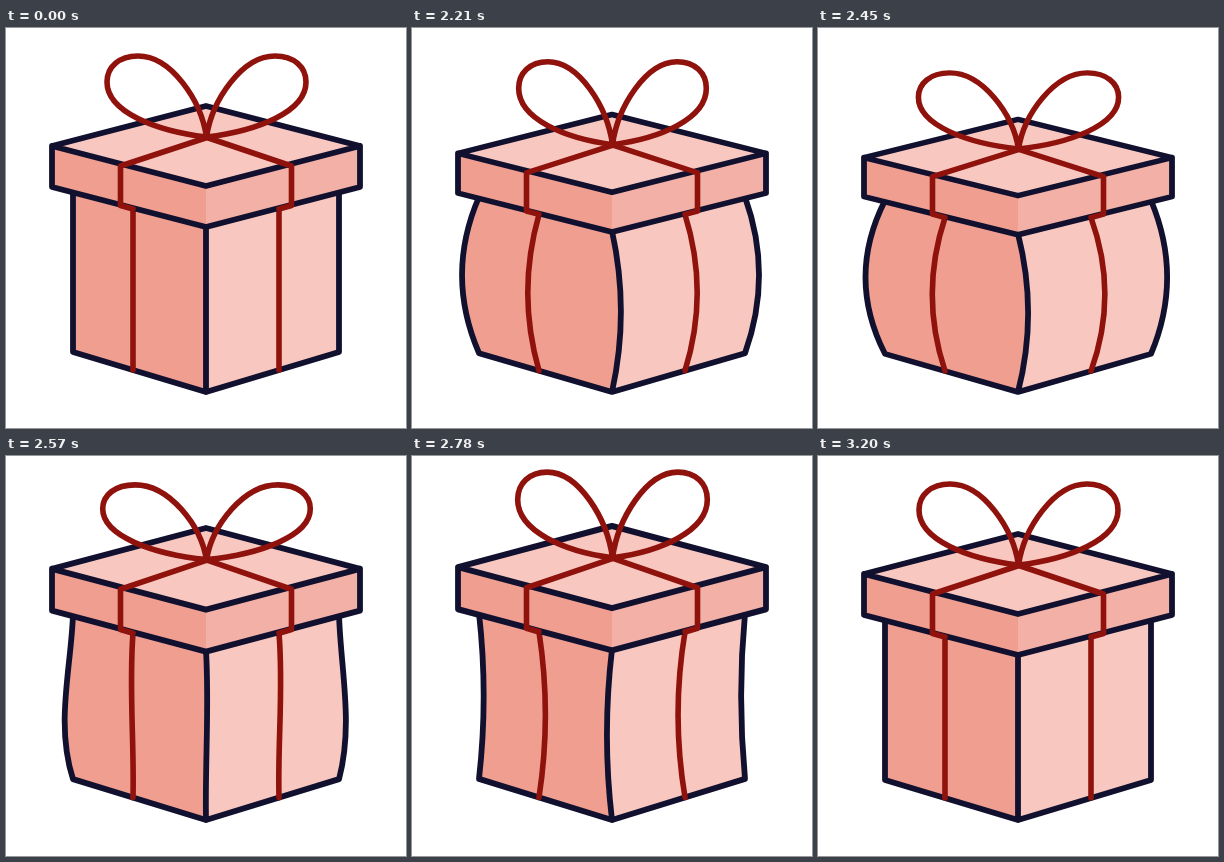
Recreate the animation shown at these times as an HTML page. Size 400 by 400 pixels, loop 3.23 s.

```html
<!DOCTYPE html>
<html lang="en">
<head>
<meta charset="utf-8">
<title>Bouncing gift box</title>
<style>
  html, body { margin: 0; width: 100%; height: 100%; overflow: hidden; background: #fff; }
  svg { display: block; width: 100%; height: 100%; }
  path { fill: none; stroke-linecap: round; stroke-linejoin: round; }
  .ink { stroke: #11112f; stroke-width: 5.8; }
  .ribbon { stroke: #8f120c; stroke-width: 5.6; }
  .left { fill: #f09e90; }
  .right { fill: #f8c8c0; }
  .rim { fill: #f2b0a6; }
</style>
</head>
<body>
<svg viewBox="0 0 400 400">
  <g id="gift">
    <path id="sideL" class="left"/>
    <path id="sideR" class="right"/>
    <path id="edges" class="ink"/>
    <path id="bands" class="ribbon"/>
    <path class="left" d="M46 118 200 158V199L46 159Z"/>
    <path class="rim" d="M354 118 200 158V199L354 159Z"/>
    <path class="right" d="M46 118 200 78 354 118 200 158Z"/>
    <path class="ink" d="M46 118 200 78 354 118 200 158ZV159L200 199 354 159V118"/>
    <path class="ribbon" d="M127 181 114.5 177.5V138L201 109.5 285.5 138V177.5L273 181"/>
    <path id="bow" class="ribbon"/>
  </g>
</svg>
<script>
const LOOP = 3230, HOLD = 2000, STEP = 30, FLOOR = 364;
const $ = id => document.getElementById(id);

// Poses: step, then one value per track
const times = [0, 1, 7, 12, 15, 19, 22, 26, 37, 40];
const tracks = {
  height: [1, .9965, .97, .952, .953, 1.021, 1.042, 1.028, 1.005, 1],
  bowW: [1, .986, .943, .975, 1.006, 1.043, .93, .953, .993, 1],
  bowH: [1, 1, 1.055, 1.03, .985, .905, 1.13, 1.03, 1.003, 1],
  outTop: [0, .14, .87, 1, 1, .08, -.2, -.24, -.04, 0],
  outLow: [0, .14, .87, 1, 1, .68, .05, -.24, -.04, 0],
  inTop: [0, .16, .88, 1, 1, .25, -.4, -.5, -.08, 0],
  inLow: [0, .16, .88, 1, 1, -.08, -.5, -.5, -.08, 0]
};

// Monotone cubic through the poses
function slope(v, i) {
  if (i < 1 || i > v.length - 2) return 0;
  const a = (v[i] - v[i - 1]) / (times[i] - times[i - 1]);
  const b = (v[i + 1] - v[i]) / (times[i + 1] - times[i]);
  return a * b > 0 ? 2 * a * b / (a + b) : 0;
}

function sample(v, k) {
  let i = 0;
  while (i < times.length - 2 && k >= times[i + 1]) i++;
  const d = times[i + 1] - times[i], u = (k - times[i]) / d, w = 1 - u;
  return v[i] * w * w * (1 + 2 * u) + v[i + 1] * u * u * (3 - 2 * u)
    + d * u * w * (w * slope(v, i) - u * slope(v, i + 1));
}

// Upright line from y0 to y1 that bends sideways; returns the curve down and up
function bend(x, y0, y1, top, low) {
  const third = (y1 - y0) / 3;
  const a = `${x + top} ${y0 + third}`, b = `${x + low} ${y1 - third}`;
  return {
    down: `${x} ${y0}C${a} ${b} ${x} ${y1}`,
    up: `${x} ${y1}C${b} ${a} ${x} ${y0}`
  };
}

function bowPath(w, h) {
  const loop = side => {
    const p = (x, y) => `${200.5 + side * w * (x - 200.5)} ${109 + h * (y - 109)} `;
    return 'M' + p(200.5, 109)
      + 'C' + p(195, 72) + p(165, 28) + p(132, 28)
      + 'C' + p(113, 28) + p(101, 39) + p(101, 54)
      + 'C' + p(101, 84) + p(150, 103) + p(200.5, 109);
  };
  return loop(1) + loop(-1);
}

function draw(k) {
  const p = {};
  for (const name in tracks) p[name] = sample(tracks[name], k);

  const outer = (x, amp) => bend(x, 163, 324, amp * p.outTop, amp * p.outLow);
  const inner = (x, y0, y1, amp) => bend(x, y0, y1, amp * p.inTop, amp * p.inLow);
  const left = outer(67, -26), right = outer(333, 21.5);
  const mid = inner(200, 198, FLOOR, 13.5);

  $('gift').setAttribute('transform', `translate(0 ${FLOOR * (1 - p.height)}) scale(1 ${p.height})`);
  $('sideL').setAttribute('d', `M${left.down}L${mid.up}Z`);
  $('sideR').setAttribute('d', `M${right.down}L${mid.up}Z`);
  $('edges').setAttribute('d', `M${left.down}L200 ${FLOOR}L${right.up}M${mid.down}`);
  $('bands').setAttribute('d',
    `M${inner(127, 181, 342, -17).down}M${inner(273, 181, 342, 18.5).down}`);
  $('bow').setAttribute('d', bowPath(p.bowW, p.bowH));
}

const start = performance.now();
function tick() {
  const t = (performance.now() - start) % LOOP;
  draw(Math.min(40, Math.max(0, Math.floor((t - HOLD) / STEP))));
  requestAnimationFrame(tick);
}
tick();
</script>
</body>
</html>
```
